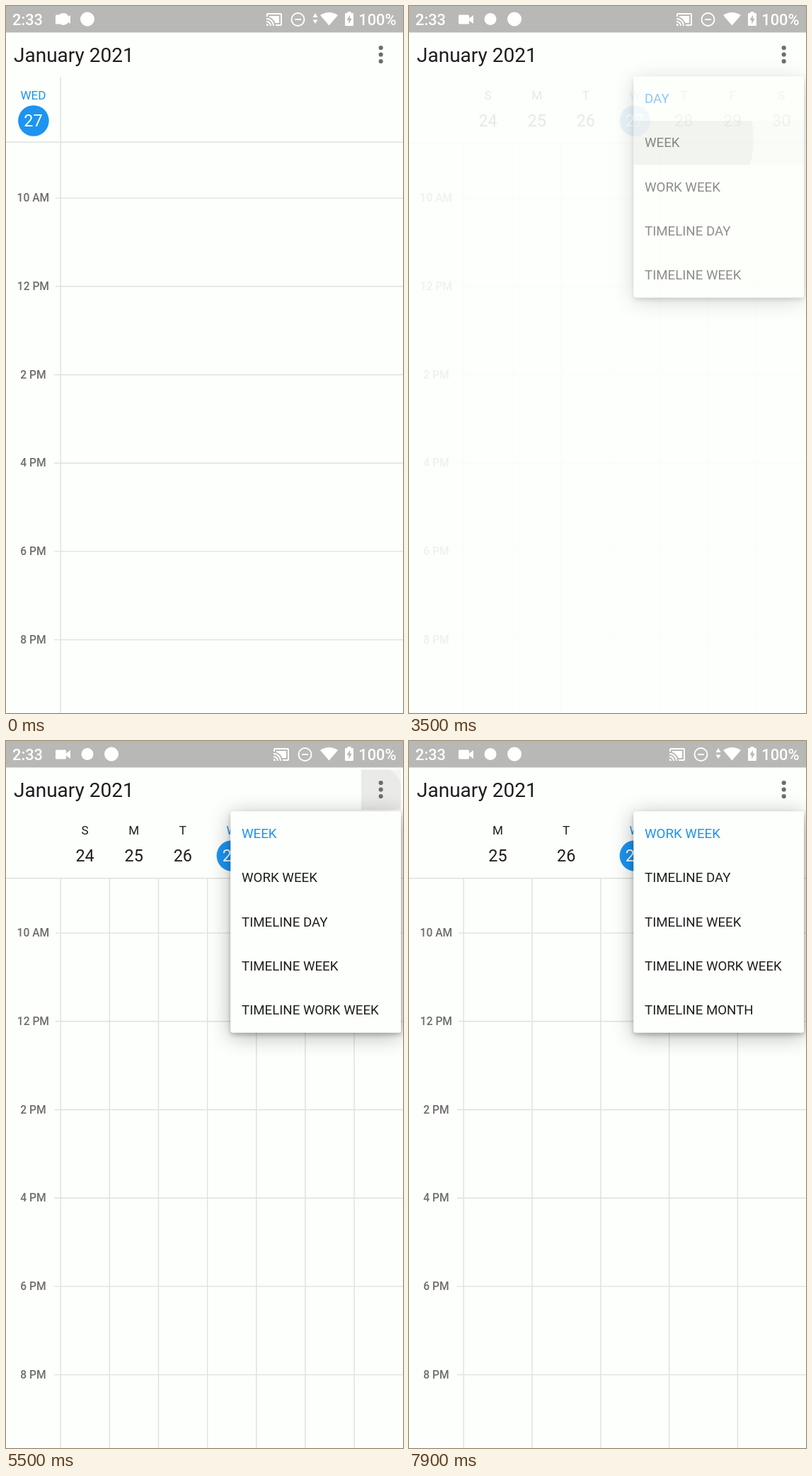
An HTML page with a canvas that plays this animation: 561 by 998 pixels, repeating every 8000 ms.

```html
<!DOCTYPE html>
<html lang="en">
<head>
<meta charset="utf-8">
<title>Calendar views</title>
<style>
  html, body { margin: 0; width: 100%; height: 100%; overflow: hidden; background: #fdfffc; }
  canvas { display: block; }
</style>
</head>
<body>
<canvas id="stage" width="561" height="998"></canvas>
<script>
const ctx = document.getElementById('stage').getContext('2d');
const W = 561, H = 998, LOOP = 8000, STEP = 100;
const PAPER = '#fdfffc', INK = '#1d1e1d', BLUE = '#1c94f0', LINE = '#dfe1de';
const GUTTER = 77, MENU_X = 317.5, MENU_Y = 99.5, MENU_W = 240.5, ITEM_H = 62.4, ROWS = 5;

const ITEMS = ['DAY', 'WEEK', 'WORK WEEK', 'TIMELINE DAY', 'TIMELINE WEEK',
  'TIMELINE WORK WEEK', 'TIMELINE MONTH'];

// Each view appears at `from` and fades in from `fade` on.
const VIEWS = [
  { from: 0, fade: -1000, first: 27, days: ['WED'] },
  { from: 3500, fade: 3633, first: 24, days: [...'SMTWTFS'] },
  { from: 6500, fade: 6500, first: 25, days: [...'MTWTF'] },
];

// press: button ripple starts, calm: it has gone; pick: item tapped, gone: menu closed.
const MENUS = [
  { press: 1900, open: 2200, calm: 2500, pick: 3300, gone: 3600, fade: 200 },
  { press: 5300, open: 5300, calm: 5700, pick: 6300, gone: 6500, fade: 100 },
  { press: 7500, open: 7500, calm: 7900, pick: 9000, gone: 9000, fade: 100 },
];

const CAST = new Path2D('M1 18v3h3c0-1.66-1.34-3-3-3zm0-4v2c2.76 0 5 2.24 5 5h2c0-3.87-3.13-7-7-7z' +
  'm18-7H5v1.63c3.96 1.28 7.09 4.41 8.37 8.37H19V7zM1 10v2c4.97 0 9 4.03 9 9h2c0-6.08-4.93-11-11-11z' +
  'm20-7H3c-1.1 0-2 .9-2 2v3h2V5h18v14h-7v2h7c1.1 0 2-.9 2-2V5c0-1.1-.9-2-2-2z');
const WIFI = new Path2D('M456.5 27.5L444 13Q456.5 5 469 13Z');
const CAMERA = new Path2D('M71.5 12.5H83.5Q85 12.5 85 14V17.5L91 13V25L85 20.5V24Q85 25.5 83.5 25.5H71.5' +
  'Q70 25.5 70 24V14Q70 12.5 71.5 12.5Z');
const BATTERY = new Path2D('M482.5 8H487.5V10H490Q491 10 491 11V27Q491 28 490 28H480' +
  'Q479 28 479 27V11Q479 10 480 10H482.5Z');
const BOLT = new Path2D('M486 12.5L481.5 20H484.3V25.5L488.7 17.8H486Z');
const UP = new Path2D('M437 10L440.5 16H433.5Z');
const DOWN = new Path2D('M437 25L440.5 19.5H433.5Z');

const clamp = (v, lo = 0, hi = 1) => Math.min(hi, Math.max(lo, v));

function fill(path, color) {
  ctx.fillStyle = color;
  ctx.fill(path);
}

function circle(x, y, r, color) {
  ctx.beginPath();
  ctx.arc(x, y, r, 0, Math.PI * 2);
  ctx.fillStyle = color;
  ctx.fill();
}

function text(str, x, y, size, color, align = 'center', weight = 400) {
  ctx.font = `${weight} ${size}px Roboto, sans-serif`;
  ctx.textAlign = align;
  ctx.fillStyle = color;
  ctx.fillText(str, x, y);
}

function line(x1, y1, x2, y2) {
  ctx.beginPath();
  ctx.moveTo(x1, y1);
  ctx.lineTo(x2, y2);
  ctx.lineWidth = 1.4;
  ctx.strokeStyle = LINE;
  ctx.stroke();
}

function clipped(x, y, w, h, draw) {
  ctx.save();
  ctx.beginPath();
  ctx.rect(x, y, w, h);
  ctx.clip();
  draw();
  ctx.restore();
}

function drawStatusBar(t) {
  ctx.fillStyle = '#b8b9b6';
  ctx.fillRect(0, 0, W, 37.4);
  const white = '#fff';
  text('2:33', 9, 27, 21.8, white, 'left', 500);
  text('100%', 551.5, 27, 21.8, white, 'right', 500);

  const slide = 34 * (1 - (1 - clamp(t / 400)) ** 2);
  fill(CAMERA, white);
  circle(81 + slide, 18.5, 8.5, white);
  circle(115 + slide, 18.5, 10, white);

  const traffic = t < 1900 || t >= 5900;
  if (traffic) fill(UP, white);
  if (traffic && !(t >= 6500 && t < 6900)) fill(DOWN, white);

  ctx.save();
  ctx.translate(traffic ? 0 : 10, 0);
  ctx.beginPath();
  ctx.arc(412.5, 19, 9, 0, Math.PI * 2);
  ctx.moveTo(408, 19);
  ctx.lineTo(417, 19);
  ctx.lineWidth = 1.9;
  ctx.strokeStyle = white;
  ctx.stroke();
  ctx.translate(367, 7);
  fill(CAST, white);
  ctx.restore();

  fill(WIFI, white);
  fill(BATTERY, white);
  fill(BOLT, '#b8b9b6');
}

function drawView(t) {
  const { fade, first, days } = VIEWS.findLast(v => t >= v.from);
  const single = days.length === 1;
  const headerY = single ? 192.3 : 193.7;
  const colW = (W - GUTTER) / days.length;

  line(0, headerY, W, headerY);
  days.forEach((_, i) => {
    const x = GUTTER + 0.2 + i * colW;
    line(x, single ? 100 : headerY, x, H);
  });
  for (let i = 0; i < 6; i++) {
    const y = 271.1 + i * 124.7;
    const label = i < 2 ? `${10 + 2 * i} ${i ? 'PM' : 'AM'}` : `${2 * i - 2} PM`;
    line(i < 2 ? 70 : 68, y, W, y);
    text(label, 38.4, y + 5.2, 15.6, '#6c6d6c', 'center', 500);
  }
  days.forEach((name, i) => {
    const x = single ? 38.5 : GUTTER + (i + 0.5) * colW;
    const today = first + i === 27;
    if (today) circle(x + 0.4, 162, 21.8, BLUE);
    text(name, x, 132.4, 17.1, today ? BLUE : INK);
    text(first + i, x, 170.2, 23.4, today ? '#fff' : INK);
  });

  // A paper veil fades the view as one group.
  ctx.globalAlpha = 1 - clamp(0.1 + 0.9 * (t - fade) / 500, 0.1, 1);
  ctx.fillStyle = PAPER;
  ctx.fillRect(0, 0, W, H);
  ctx.globalAlpha = 1;
}

function drawAppBar(t) {
  text('January 2021', 11, 79, 28, INK, 'left');

  for (const m of MENUS) {
    if (t < m.press || t >= m.calm) continue;
    ctx.globalAlpha = clamp((m.calm - t) / 200);
    clipped(502, 40.5, 56, 56.5, () => {
      ctx.fillStyle = '#f3f5f2';
      ctx.fillRect(502, 40, 56, 57);
      circle(520, 75, 41, '#eaebe9');
    });
    ctx.globalAlpha = 1;
  }
  for (const dy of [-9.5, 0, 9.5]) circle(529.7, 68.5 + dy, 3.1, '#6d6e6d');
}

function drawPanel(x, y, w, h) {
  const panel = new Path2D();
  panel.roundRect(x, y, w, h, 3);
  const outside = new Path2D(panel);
  outside.rect(0, 0, W, H);

  ctx.save();
  ctx.clip(outside, 'evenodd');
  for (const [blur, dy, alpha] of [[30, 5, 0.3], [6, 3, 0.24]]) {
    ctx.shadowColor = `rgba(0,0,0,${alpha})`;
    ctx.shadowBlur = blur;
    ctx.shadowOffsetY = dy;
    fill(panel, PAPER);
  }
  ctx.restore();
  fill(panel, PAPER);
}

function drawMenu(t) {
  const index = MENUS.findIndex(m => t > m.open && t < m.gone);
  if (index < 0) return;
  const menu = MENUS[index];
  const grow = clamp((t - menu.open) / 200);
  const w = MENU_W * clamp(grow * 1.6), h = ITEM_H * ROWS * grow;
  const x = MENU_X + MENU_W - w;
  const alpha = clamp(grow * 3) * clamp((menu.gone - t) / menu.fade);

  ctx.globalAlpha = alpha;
  drawPanel(x, MENU_Y, w, h);
  clipped(x, MENU_Y, w, h, () => {
    if (t >= menu.pick) {
      const top = MENU_Y + ITEM_H;
      clipped(MENU_X, top, MENU_W, ITEM_H, () => {
        ctx.fillStyle = 'rgba(0,0,0,0.025)';
        ctx.fillRect(MENU_X, top, MENU_W, ITEM_H);
        circle(363, 188, 24 + (index ? 0 : (t - menu.pick) * 0.5), 'rgba(0,0,0,0.06)');
      });
    }
    ITEMS.slice(index, index + ROWS).forEach((name, i) => {
      ctx.globalAlpha = alpha * clamp(grow * 8 - i - 1);
      text(name, x + 15.5, MENU_Y + (i + 0.5) * ITEM_H + 6.1, 18.7, i ? INK : BLUE, 'left');
    });
  });
  ctx.globalAlpha = 1;
}

function render(now) {
  const t = Math.floor((now % LOOP) / STEP) * STEP;
  ctx.fillStyle = PAPER;
  ctx.fillRect(0, 0, W, H);
  drawView(t);
  drawStatusBar(t);
  drawAppBar(t);
  drawMenu(t);
}

let start;
function tick(now) {
  start ??= now;
  render(now - start);
  requestAnimationFrame(tick);
}
render(0);
requestAnimationFrame(tick);
</script>
</body>
</html>
```
